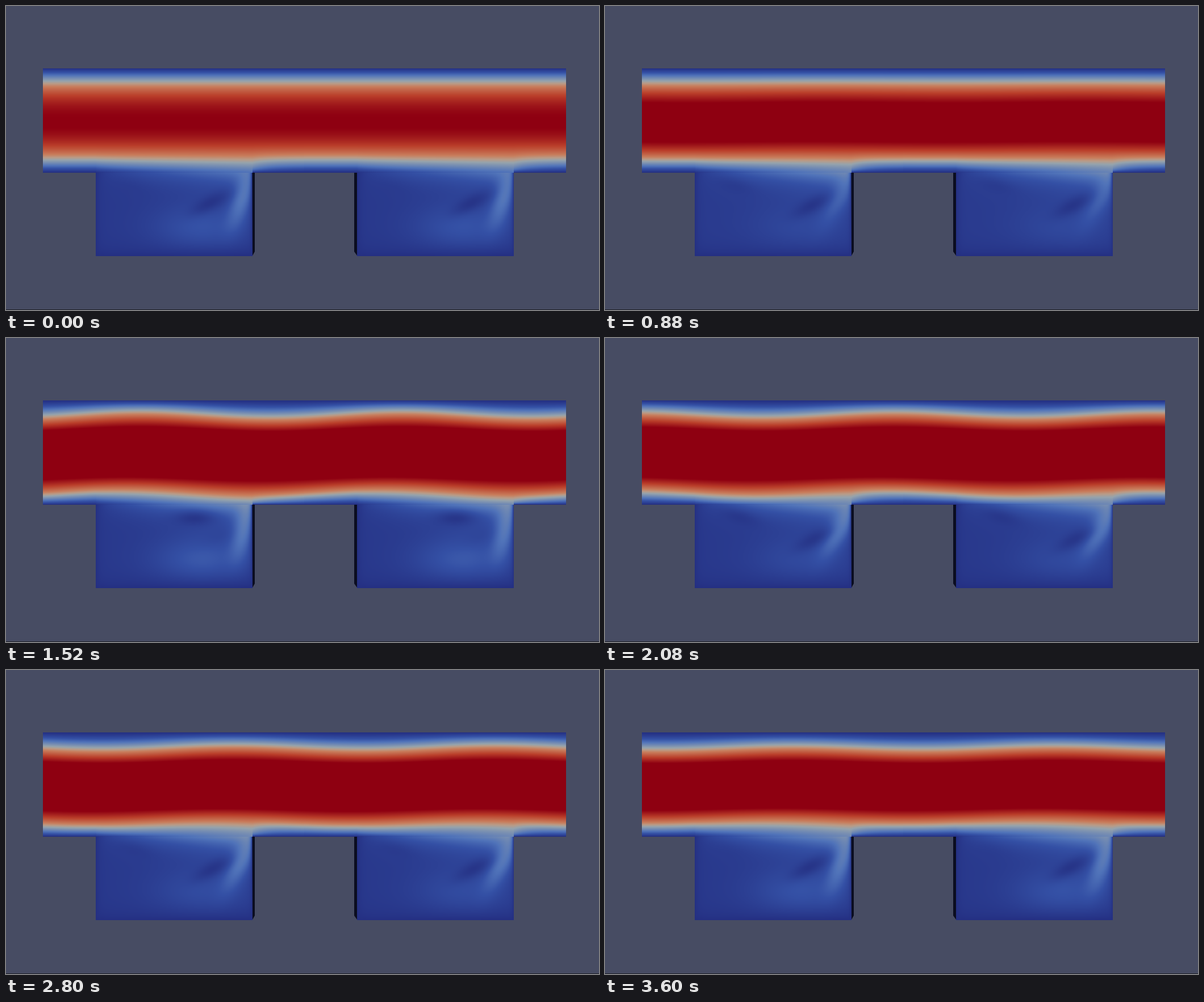
A matplotlib script for the animation above (3.68 s loop, 1044 by 536 pixels).

```python
import numpy as np
import matplotlib.pyplot as plt
from matplotlib.animation import FuncAnimation
from matplotlib.patches import Polygon

W, H, DPI = 1044, 536, 100
FRAMES, STEP = 46, 80
BACK = (71, 76, 99)

# Flow domain in pixels: two periods of a channel with a cavity below
X0, PERIOD = 65, 460
TOP, FLOOR, BOTTOM = 110, 293.5, 441
CAV_L, CAV_R = 158, 434
DEPTH = FLOOR - TOP

# Timing in steps: the flow speeds up, then a wave runs through and decays
START, FULL = 8, 15
WAVE_SPEED = 39
CYCLE = PERIOD / WAVE_SPEED

# Speed to colour
STOPS = [0, .15, .25, .43, .5, .58, .78, 1]
COLORS = [(36, 47, 130), (52, 80, 165), (80, 115, 185), (150, 163, 172),
          (185, 155, 135), (200, 125, 92), (186, 62, 42), (142, 0, 17)]
RAMP = np.linspace(0, 1, 1024)
LUT = np.stack([np.interp(RAMP, STOPS, c) for c in zip(*COLORS)], axis=1)

# Path of a slow eddy core through the cavity, by age in cycles
AGE = [.4, 1, 1.35, 1.55, 2, 2.4]
EDDY_X = [215, 240, 335, 360, 368, 372]
EDDY_Y = [318, 316, 318, 349, 356, 352]
EDDY_TILT = [12, 16, 0, -28, -28, -20]
EDDY_DARK = [0, .6, .75, .75, .65, 0]

x = X0 + np.arange(PERIOD) + .5
y = (np.arange(TOP, BOTTOM) + .5)[:, None]
in_cav = (x > CAV_L) & (x < CAV_R)
below = y > FLOOR
along = np.clip((x - CAV_L) / (CAV_R - CAV_L), 0, 1)


def core_edges(n):
    """Upper and lower edge of the fast core."""
    rise = np.exp(-max(n - START, 0) / 2.4)
    drift = max(n - FULL, 0)
    grow = np.clip((n - START) / (FULL - START), 0, 1) ** 2
    amp = grow * np.exp(-drift / 50)
    a = 2 * np.pi * (x - 80 - WAVE_SPEED * (n - FULL)) / PERIOD
    lag = 2 * np.pi * 25 / PERIOD
    upper = 159.5 + .08 * drift + 36.5 * rise - 4.4 * amp * np.cos(a)
    lower = 249.5 - .13 * drift - 35 * rise - 3.6 * amp * np.cos(a + lag)
    return upper, lower


def profile(dist, width, n):
    """Speed by distance from a wall; 1 at the edge of the core."""
    u = np.clip(dist / width, 0, 1)
    eta = width / DEPTH
    parabola = u * (1 - u * eta) / (1 - eta)
    sheared = u ** (1 + .045 * (width - 49))
    k = np.clip((n - 10) / 5, 0, 1)
    return (1 - k) * parabola + k * sheared


def wall(d, width):
    return 1 - np.exp(-np.maximum(d, 0) / width)


def blob(cx, cy, long, short, angle, strength):
    ca, sa = np.cos(np.radians(angle)), np.sin(np.radians(angle))
    dx, dy = x - cx, y - cy
    u, v = dx * ca + dy * sa, dy * ca - dx * sa
    return strength * np.exp(-(u / long) ** 2 - (v / short) ** 2)


def cavity_flow(n, slip):
    cycles = .54 + .46 * np.clip((n - START) / (FULL - START), 0, 1)
    cycles = (cycles + max(n - FULL, 0) / CYCLE) % 1
    swing = np.cos(2 * np.pi * (cycles - .35))
    surge = np.exp(-((n - 13) / 3) ** 2)

    tilt = 112 - 10 * swing
    flow = .045 + .015 * surge
    flow = flow + blob(418 - .35 * (tilt - 102), 340, 52, 19, tilt,
                       .17 - .1 * surge)
    flow = flow + blob(345, 392, 85, 42, 0, .1 + .03 * swing - .03 * surge)

    s = slip * np.exp(-(y - FLOOR) / (13 + 14 * along))
    s = s + flow * wall(y - FLOOR + 6, 10)
    for age in cycles + np.arange(3):
        cx, cy, angle, dark = (np.interp(age, AGE, v, left=v[0], right=v[-1])
                               for v in (EDDY_X, EDDY_Y, EDDY_TILT, EDDY_DARK))
        s = s * (1 - blob(cx, cy, 36, 13, angle, dark))
    return s * wall(BOTTOM - y, 14) * wall(x - CAV_L, 6) * wall(CAV_R - x, 3)


def speed(n):
    t, b = core_edges(n)
    strength = .25 + .08 * np.clip((n - START) / 4, 0, 1)
    slip = strength * along ** .6 * np.exp(-np.maximum(x - CAV_R, 0) / 30)

    upper = profile(y - TOP, t - TOP, n)
    lower = profile(FLOOR - y, FLOOR - b, n)
    lift = np.where(in_cav, 1, wall(FLOOR - y, 4))
    lower = lower + slip * (1 - lower) ** 2.5 * lift
    return np.where(below, cavity_flow(n, slip), np.minimum(upper, lower))


def picture(n):
    rgb = LUT[(np.clip(speed(n), 0, 1) * 1023).astype(int)]
    rgb[below & ~in_cav] = BACK
    img = np.empty((H, W, 3))
    img[:] = BACK
    right = X0 + 2 * PERIOD
    img[TOP:BOTTOM, X0:right] = np.tile(rgb, (1, 2, 1))
    img[TOP:BOTTOM, right] = rgb[:, 0]
    img[H - 1] = (28, 29, 36)
    return np.round(img).astype(np.uint8)


fig = plt.figure(figsize=(W / DPI, H / DPI), dpi=DPI)
ax = fig.add_axes([0, 0, 1, 1])
ax.axis("off")
view = ax.imshow(picture(0), extent=(0, W, H, 0), interpolation="nearest",
                 aspect="auto")
for pts in ([(433.5, 294), (438, 294), (438, 433), (434, 440)],
            [(613, 294), (618, 294), (618, 440), (613, 433)]):
    ax.add_patch(Polygon(pts, facecolor="#0b0d20", edgecolor="none"))
ax.set_xlim(0, W)
ax.set_ylim(H, 0)


def update(n):
    view.set_data(picture(n))
    return [view]


anim = FuncAnimation(fig, update, frames=FRAMES, interval=STEP, repeat=True,
                     repeat_delay=0, blit=False)
plt.show()
```
